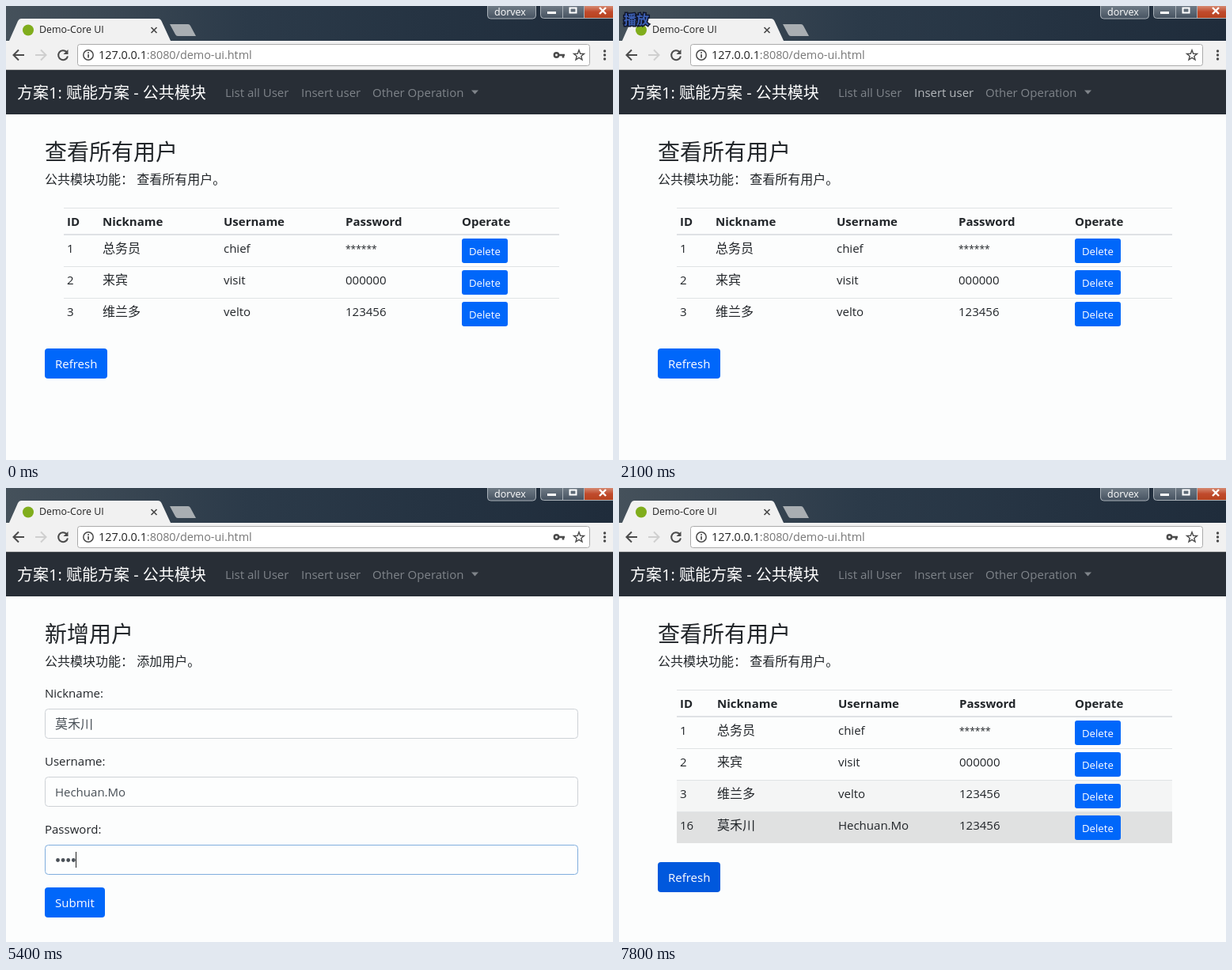
An HTML page that plays this animation: 767 by 574 pixels, repeating every 8 s.

```html
<!DOCTYPE html>
<html lang="zh-CN">
<head>
<meta charset="utf-8">
<title>User list demo</title>
<style>
html, body { margin: 0; width: 100%; height: 100%; overflow: hidden; background: #fcfdfd; }
svg { display: block; width: 767px; height: 574px; font-family: "Open Sans", "Noto Sans CJK SC", "Noto Sans CJK", sans-serif; }
text { white-space: pre; }
</style>
</head>
<body>
<svg id="stage" viewBox="0 0 767 574" xmlns="http://www.w3.org/2000/svg"></svg>
<script>
const LOOP = 8000, STEP = 100;
const INK = '#212529', BLUE = '#0067fa', PAPER = '#fcfdfd';
const FONT = '"Open Sans", "Noto Sans CJK SC", "Noto Sans CJK", sans-serif';
const stage = document.getElementById('stage');
const pen = document.createElement('canvas').getContext('2d');

const nickname = '莫禾川', username = 'Hechuan.Mo';
const users = [
  ['1', '总务员', 'chief', '******'],
  ['2', '来宾', 'visit', '000000'],
  ['3', '维兰多', 'velto', '123456'],
  ['16', nickname, username, '123456']
];

const clamp = v => Math.max(0, Math.min(1, v));
const ramp = (t, a, b) => clamp((t - a) / (b - a));
const between = (t, a, b) => t >= a && t < b;
// Highest count whose start time has passed.
const countAt = (t, keys) => keys.reduce((n, [at, count]) => t >= at ? count : n, 0);

const text = (x, y, s, size = 15, fill = INK, extra = '') =>
  `<text x="${x}" y="${y}" font-size="${size}" fill="${fill}" ${extra}>${s}</text>`;
const rect = (x, y, w, h, fill, extra = '') =>
  `<rect x="${x}" y="${y}" width="${w}" height="${h}" fill="${fill}" ${extra}/>`;
const path = (d, stroke, width = 2, fill = 'none', extra = '') =>
  `<path d="${d}" stroke="${stroke}" stroke-width="${width}" fill="${fill}" ${extra}/>`;
const group = (opacity, s) => opacity > 0 ? `<g opacity="${opacity}">${s}</g>` : '';

const defs = `<defs>
  <linearGradient id="bar"><stop offset="0" stop-color="#45515b"/><stop offset=".4" stop-color="#2b3a49"/><stop offset="1" stop-color="#1f2c3b"/></linearGradient>
  <linearGradient id="close" x2="0" y2="1"><stop offset="0" stop-color="#d58a72"/><stop offset=".5" stop-color="#c04a2c"/><stop offset="1" stop-color="#b8431f"/></linearGradient>
  <linearGradient id="glass" x2="0" y2="1"><stop offset="0" stop-color="#7c8791"/><stop offset="1" stop-color="#465361"/></linearGradient>
  <linearGradient id="titleFade" gradientUnits="userSpaceOnUse" x1="150" x2="176"><stop offset="0" stop-color="#222"/><stop offset="1" stop-color="#222" stop-opacity="0"/></linearGradient>
</defs>`;

function windowFrame() {
  return rect(0, 0, 767, 44, 'url(#bar)')
    + rect(608.5, -5, 61, 21, 'url(#glass)', 'rx="4" stroke="#a9b1b8"')
    + text(617, 12, 'dorvex', 12.5, '#fff')
    + rect(675.5, -5, 100, 20.5, 'url(#glass)', 'rx="4" stroke="#a9b1b8"')
    + rect(731, 0, 36, 15, 'url(#close)')
    + path('M703.5 0V15M730.5 0V15', '#a9b1b8', 1)
    + rect(684, 7, 11, 3, '#fff')
    + path('M712.5 2.5h8v6h-8z', '#fff', 2)
    + path('M750 2l8 8M758 2l-8 8', '#fff', 2.4)
    + path('M207 23H230Q232 23 233 25L240 38H217Q215 38 214 36Z', 'none', 0, '#a9aeb2')
    + path('M4 44L15 19Q16.5 16 19 16H192Q195 16 196.5 19L208 44Z', 'none', 0, '#f1f1f1')
    + rect(0, 44, 767, 37, '#f1f1f1');
}

function chrome(loading, showKey, t) {
  const turn = t * .36 % 360;
  const tab = loading
    ? path('M28 24.5A6 6 0 1 1 22 30.5', '#4a83dc', 2, 'none', `transform="rotate(${turn} 28 30.5)"`)
      + text(42, 34, '127.0.0.1:8080/demo-u', 12.4, 'url(#titleFade)')
    : '<circle cx="28" cy="30.5" r="7" fill="#80ad1c"/>' + text(42, 34, 'Demo-Core UI', 12.4, '#222');
  const reload = loading
    ? path('M66.5 56.5l11 11M77.5 56.5l-11 11', '#555')
    : path('M76.5 58A6 6 0 1 0 78 63.5', '#4b4b4b') + path('M78.5 55V61H72.5Z', 'none', 0, '#4b4b4b');
  const key = '<circle cx="695.5" cy="62" r="2.7" fill="none" stroke="#4b4b4b" stroke-width="2.4"/>'
    + path('M698.5 62H706M704 62V65.5', '#4b4b4b', 2.6);
  const star = Array.from({ length: 10 }, (_, i) => {
    const r = i % 2 ? 2.9 : 6.8, a = -Math.PI / 2 + i * Math.PI / 5;
    return (724 + r * Math.cos(a)).toFixed(1) + ' ' + (62.5 + r * Math.sin(a)).toFixed(1);
  }).join('L');
  return windowFrame() + tab
    + path('M183.5 27l7 7M190.5 27l-7 7', '#4a4a4a', 1.7)
    + path('M23 62H10M16 55.5L9.5 62L16 68.5', '#4b4b4b')
    + path('M37 62H50M44 55.5L50.5 62L44 68.5', '#cfcfcf')
    + reload
    + rect(90.5, 48.5, 647, 27, '#fff', 'rx="3" stroke="#aaa"')
    + '<circle cx="104" cy="62" r="6.2" fill="none" stroke="#4b4b4b" stroke-width="1.5"/>'
    + rect(103.2, 61, 1.7, 4.5, '#4b4b4b') + rect(103.2, 58.2, 1.7, 1.8, '#4b4b4b')
    + text(117, 67, '127.0.0.1<tspan fill="#777">:8080/demo-ui.html</tspan>', 14.4, '#222')
    + (showKey ? key : '')
    + path('M' + star + 'Z', '#4b4b4b', 1.4)
    + [57, 62, 67].map(y => `<circle cx="756.5" cy="${y}" r="1.7" fill="#4b4b4b"/>`).join('')
    + rect(0, 80, 767, 1, '#b9b9b9');
}

function navbar(hovered) {
  const tone = name => name === hovered ? '#b5b9bd' : '#7f848a';
  return rect(0, 81, 767, 56, '#282e36')
    + text(14, 117, '方案1: 赋能方案 - 公共模块', 20, '#fff')
    + [[277, 'List all User'], [373, 'Insert user'], [463, 'Other Operation']]
      .map(([x, s]) => text(x, 115, s, 15, tone(s))).join('')
    + path('M588 106.5h9l-4.5 5z', 'none', 0, '#7f848a');
}

const heading = (title, note) => text(49, 195, title, 28) + text(49, 225, '公共模块功能： ' + note, 16);

const button = (x, y, w, h, label, size, dx, dy, fill = BLUE) =>
  rect(x, y, w, h, fill, `rx="${h > 35 ? 4 : 3}"`) + text(x + dx, y + dy, label, size, '#fff');

function listPage(count, shades = [], refreshFill = BLUE) {
  const columns = count > 3 ? [77, 124, 277, 430, 576] : [77, 122, 275, 429, 576];
  const head = ['ID', 'Nickname', 'Username', 'Password', 'Operate']
    .map((s, i) => text(columns[i], 278, s, 15, INK, 'font-weight="700"')).join('');
  const rows = users.slice(0, count).map((user, r) => {
    const y = 290 + 40 * r;
    const cells = user.map((s, c) => {
      const size = s[0] === '*' ? 12 : c === 1 ? 16 : 15;
      return text(columns[c], y + 22, s, size);
    }).join('');
    return rect(73, y, 626, 39, '#000', `opacity="${shades[r] || 0}"`)
      + (r ? rect(73, y - 1, 626, 1, '#e0e3e5') : '') + cells
      + button(576, y + 4, 58, 31, 'Delete', 13.2, 9, 21);
  }).join('');
  return heading('查看所有用户', '查看所有用户。')
    + rect(73, 255, 626, 1, '#e0e3e5') + rect(73, 288, 626, 2, '#dfe2e5')
    + head + rows
    + button(49, 313 + 40 * count, 79, 38, 'Refresh', 15, 13, 25, refreshFill);
}

function measure(s, size) {
  pen.font = size + 'px ' + FONT;
  return pen.measureText(s).width;
}

function field(y, label, value, size, focused, dots = 0) {
  const width = dots ? dots * 6.6 : measure(value, size);
  const marks = Array.from({ length: dots }, (_, i) =>
    `<circle cx="${65.5 + i * 6.6}" cy="${y + 19.5}" r="2.4" fill="#495057"/>`).join('');
  return text(49, y - 14, label)
    + rect(49.5, y + .5, 673, 37, '#fdfefe', `rx="4" stroke="${focused ? '#80aede' : '#ced2d6'}"`)
    + text(62, y + 25, value, size, '#495057') + marks
    + (focused ? rect(Math.round(62 + width), y + 9, 1, 20, '#222') : '');
}

function formPage(t) {
  const cleared = t >= 6600;
  const nickCount = countAt(t, [[2800, 1], [2900, 2], [3000, 3]]);
  const nameCount = countAt(t, [[3300, 1], [3600, 2], [3700, 4], [3800, 5], [3900, 7], [4100, 8], [4300, 9], [4500, 10]]);
  const dots = cleared ? 0 : Math.round(clamp((t - 5000) / 600) * 6);
  const glow = t >= 5700 ? rect(47.5, 503.5, 79, 41, 'none', 'rx="6" stroke="#74b3ff" stroke-width="3"') : '';
  return heading('新增用户', '添加用户。')
    + field(279, 'Nickname:', cleared ? '' : nickname.slice(0, nickCount), 16, between(t, 2600, 3100))
    + field(365, 'Username:', cleared ? '' : username.slice(0, nameCount), 15, between(t, 3100, 4800))
    + field(451, 'Password:', '', 15, between(t, 4800, 5700), dots)
    + glow + button(49, 505, 76, 38, 'Submit', 15, 13, 25);
}

function dialog() {
  return rect(184, 66, 404, 125, '#000', 'rx="4" opacity=".18"')
    + rect(185.5, 66.5, 401, 122, '#fff', 'rx="3" stroke="#c4c4c4"')
    + text(199, 95, '来自 127.0.0.1:8080', 15.2, '#222')
    + text(199, 125, 'Insert Operation Success !', 12.4, '#333')
    + rect(500.5, 143.5, 71, 29, '#4480df', 'rx="2" stroke="#346cc4"')
    + text(523, 163, '确定', 13, '#fff', 'font-weight="700"');
}

function draw(t) {
  const loading = between(t, 1100, 1500);
  const showKey = t < 1100 || t >= 4800;
  const hovered = between(t, 1900, 2300) ? 'Insert user' : between(t, 7000, 7200) ? 'List all User' : '';

  let page;
  if (t < 2300) page = listPage(3);
  else if (t < 7200) page = formPage(t);
  else {
    const row3 = .09 * Math.min(ramp(t, 7400, 7500), 1 - ramp(t, 7600, 7900));
    const row4 = .11 * ramp(t, 7600, 7800);
    page = listPage(4, [0, 0, row3, row4], t >= 7600 ? '#0058dd' : BLUE);
  }
  const pageOpacity = t < 1500 ? 1 - ramp(t, 300, 1100) : 1;
  const alertOpacity = ramp(t, 5800, 6100) * (1 - ramp(t, 6600, 7000));
  const label = ramp(t, 700, 1100) * (1 - ramp(t, 2300, 2700));

  stage.innerHTML = defs + rect(0, 0, 767, 574, PAPER)
    + group(pageOpacity, navbar(hovered) + page)
    + chrome(loading, showKey, t)
    + group(alertOpacity, dialog())
    + group(label, text(6, 23, '播放', 16, '#3c5fb4',
      'font-weight="700" stroke="#10162c" stroke-width="3" paint-order="stroke"'));
}

let shown = -1;
const start = performance.now();
function tick() {
  const t = Math.floor((performance.now() - start) % LOOP / STEP) * STEP;
  if (t !== shown) draw(shown = t);
  requestAnimationFrame(tick);
}
tick();
</script>
</body>
</html>
```
